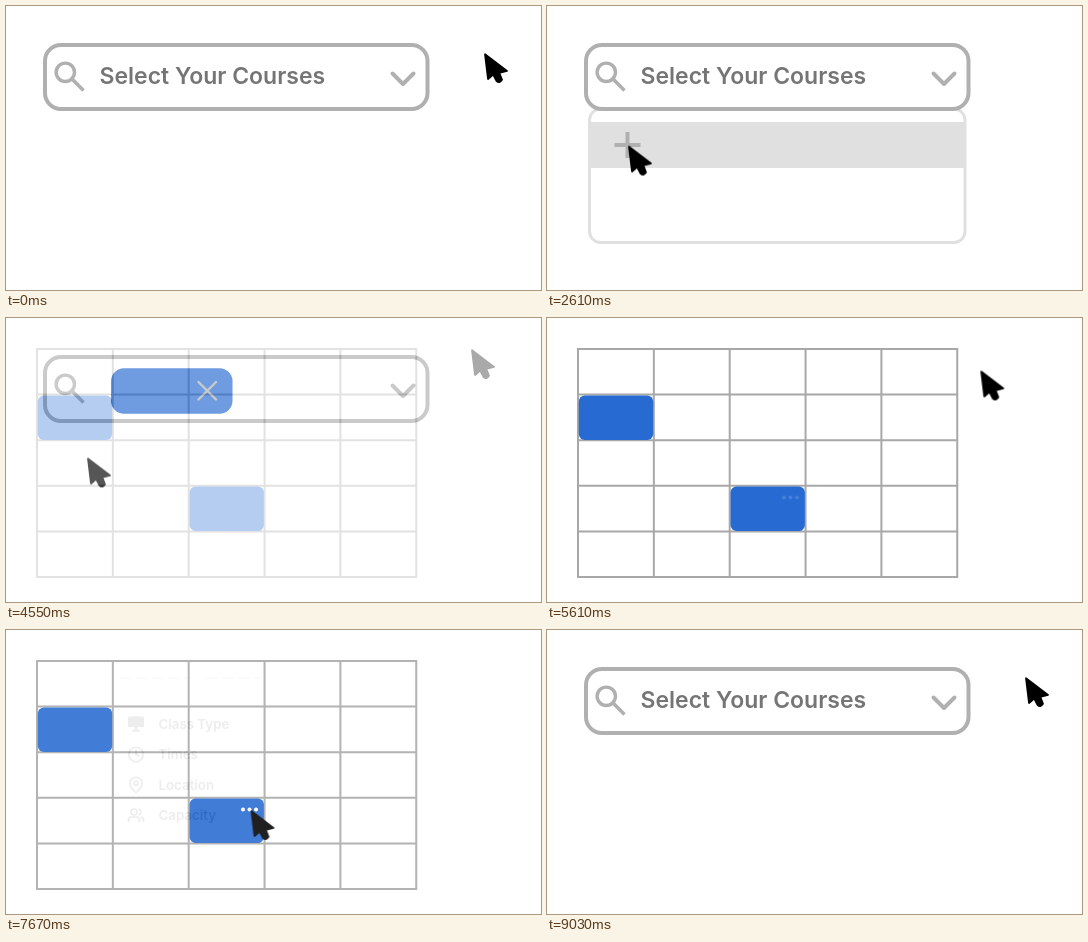
An HTML page that plays this animation: 535 px wide and 284 px high, repeating every 9420 ms.

```html
<!DOCTYPE html>
<html lang="en">
<head>
<meta charset="utf-8">
<title>Course picker</title>
<style>
  html, body { margin: 0; width: 100%; height: 100%; overflow: hidden; background: #fff; }
  svg { display: block; width: 535px; height: 284px; }
  text { font: 600 23px Inter, sans-serif; fill: #757575; }
  #card text { font-size: 13.3px; }
  .line { fill: none; stroke: #b0b0b0; stroke-width: 4; stroke-linecap: round; stroke-linejoin: round; }
  .icon { fill: none; stroke: #757575; stroke-width: 1.6; stroke-linecap: round; stroke-linejoin: round; }
  .page { fill: #fff; }
  .blue { fill: #266ad2; }
</style>
</head>
<body>
<svg viewBox="0 0 535 284">
  <defs>
    <path id="arrow" d="M1 1.2 L4 26 L9.2 21.6 L12.6 28 Q15.5 30.6 18 26.8 L15.4 20 L23 18 Z"
      stroke="#000" stroke-width="1.8" stroke-linejoin="round"/>
  </defs>

  <g id="search">
    <rect id="menu" x="42.5" y="103" width="375.5" height="133.5" rx="11" fill="#fff"/>
    <rect id="row" x="44" y="116" width="372.5" height="46" fill="#e0e0e0"/>
    <rect id="frame" x="42.5" y="103" width="375.5" height="133.5" rx="11"
      fill="none" stroke="#000" stroke-opacity=".12" stroke-width="3"/>
    <g id="plus"><path class="line" style="stroke-linecap:butt" d="M-13 0H13M0 -13V13"/></g>
    <rect class="line" style="fill:#fff" x="39" y="39" width="382.5" height="64" rx="16"/>
    <circle class="line" style="stroke-width:3.4" cx="59.3" cy="66.3" r="9.2"/>
    <path class="line" style="stroke-width:3.6;stroke-linecap:butt" d="M65.8 72.8L77.5 84.5"/>
    <path class="line" d="M386.5 67.5L397 78L407.5 67.5"/>
    <g id="chip">
      <rect class="blue" x="105" y="50.3" width="121.5" height="45.5" rx="13"/>
      <path class="line" style="stroke-width:2.4" d="M192.5 64L210 81.500M210 64L192.500 81.500"/>
    </g>
    <text id="label" x="93.500" y="78">Select Your Courses</text>
    <g id="pointer"><use href="#arrow"/></g>
  </g>

  <g id="table">
    <rect class="page" width="535" height="284"/>
    <path id="lines" fill="none" stroke="#a8a8a8" stroke-width="2"/>
    <rect class="blue" x="31.800" y="77.600" width="74.400" height="44.400" rx="6"/>
    <rect class="blue" x="183.500" y="168.600" width="74.400" height="44.400" rx="6"/>
    <g id="dots" fill="#fff">
      <circle cx="237" cy="179.500" r="2"/>
      <circle cx="243.500" cy="179.500" r="2"/>
      <circle cx="250" cy="179.500" r="2"/>
    </g>
    <g id="pointer2"><use href="#arrow"/></g>
  </g>

  <g id="card">
    <rect class="page" width="535" height="284"/>
    <path d="M113 48H181M200 48H256" stroke="#c4c4c4" stroke-dasharray="12 4"/>
    <path fill="#757575" d="M123.500 86.500h13a1.500 1.500 0 0 1 1.500 1.500v9h-16v-9a1.500 1.500 0 0 1 1.500-1.500zM128.500 97h3v3h2.500v1.500h-8v-1.500h2.500z"/>
    <g class="icon">
      <circle cx="130" cy="124.500" r="7.200"/>
      <path d="M130 120v4.500l3 1.600"/>
      <path d="M130 162.500q-6-5-6-9.300a6 6 0 0 1 12 0q0 4.300-6 9.300z"/>
      <circle cx="130" cy="153.300" r="2"/>
      <circle cx="128" cy="182" r="3"/>
      <path d="M122.500 191.500v-1.500q0-3 3-3h5q3 0 3 3v1.500M133 179.200a3 3 0 0 1 0 5.700M137.500 191.500v-1.500q0-2.300-2.300-2.900"/>
    </g>
    <g id="items"></g>
  </g>
</svg>

<script>
const LOOP = 9420, RESET = 8200;
const $ = id => document.getElementById(id);
const at = (x, y) => `translate(${x}px, ${y}px)`;

// Grid lines and card rows
let d = "";
for (let i = 0; i < 6; i++) {
  const x = 31 + i * 75.85, y = 31 + i * 45.6;
  d += `M${x} 30V260M30 ${y}H411`;
}
$("lines").setAttribute("d", d);
$("items").innerHTML = ["Class Type", "Times", "Location", "Capacity"]
  .map((s, i) => `<text x="152.5" y="${99 + i * 30.3}">${s}</text>`).join("");

// Each step: [from ms, to ms, value, easing]; equal times make a hard change
function play(id, prop, start, ...steps) {
  const keys = [{ offset: 0, [prop]: start }];
  let value = start;
  for (const [from, to, next, easing = "ease-in-out"] of steps) {
    keys.push({ offset: from / LOOP, [prop]: value, easing });
    keys.push({ offset: to / LOOP, [prop]: next });
    value = next;
  }
  keys.push({ offset: 1, [prop]: value });
  $(id).animate(keys, { duration: LOOP, iterations: Infinity });
}

const OPEN = [1360, 1360], PICK = [3030, 4010], BACK = [RESET, RESET];

play("pointer", "transform", at(478, 47),
  [530, 980, at(400, 77)], [1780, 2610, at(81, 139.5)], [...BACK, at(478, 47)]);

for (const id of ["menu", "frame"]) {
  play(id, "opacity", 0, [...OPEN, 1], [...PICK, 0, "ease-in"]);
  play(id, "height", "133.5px", [...PICK, "0px", "ease-out"], [...BACK, "133.5px"]);
}
play("row", "opacity", 0, [1780, 2610, 1], [...PICK, 0, "ease-in"]);
play("row", "y", "116px", [...PICK, "94px", "ease-out"], [...BACK, "116px"]);
play("row", "height", "46px", [...PICK, "56px", "ease-out"], [...BACK, "46px"]);
play("plus", "opacity", 0, [...OPEN, 1], [...PICK, 0, "ease-out"]);
play("plus", "transform", at(80.5, 139), [...PICK, at(80.5, 117.3), "ease-out"], [...BACK, at(80.5, 139)]);
play("label", "opacity", 1, [...PICK, 0, "ease-out"], [...BACK, 1]);
play("chip", "opacity", 0, [...PICK, 1, "ease-out"], [...BACK, 0]);

play("table", "opacity", 0, [4030, 5030, 1, "ease-in"], [...BACK, 0]);
play("pointer2", "transform", at(465, 31), [5150, 6900, at(244.5, 180)]);
play("dots", "opacity", 0, [5150, 6900, 1]);
play("card", "opacity", 0, [7560, 8010, 1], [8780, 9040, 0]);
</script>
</body>
</html>
```
